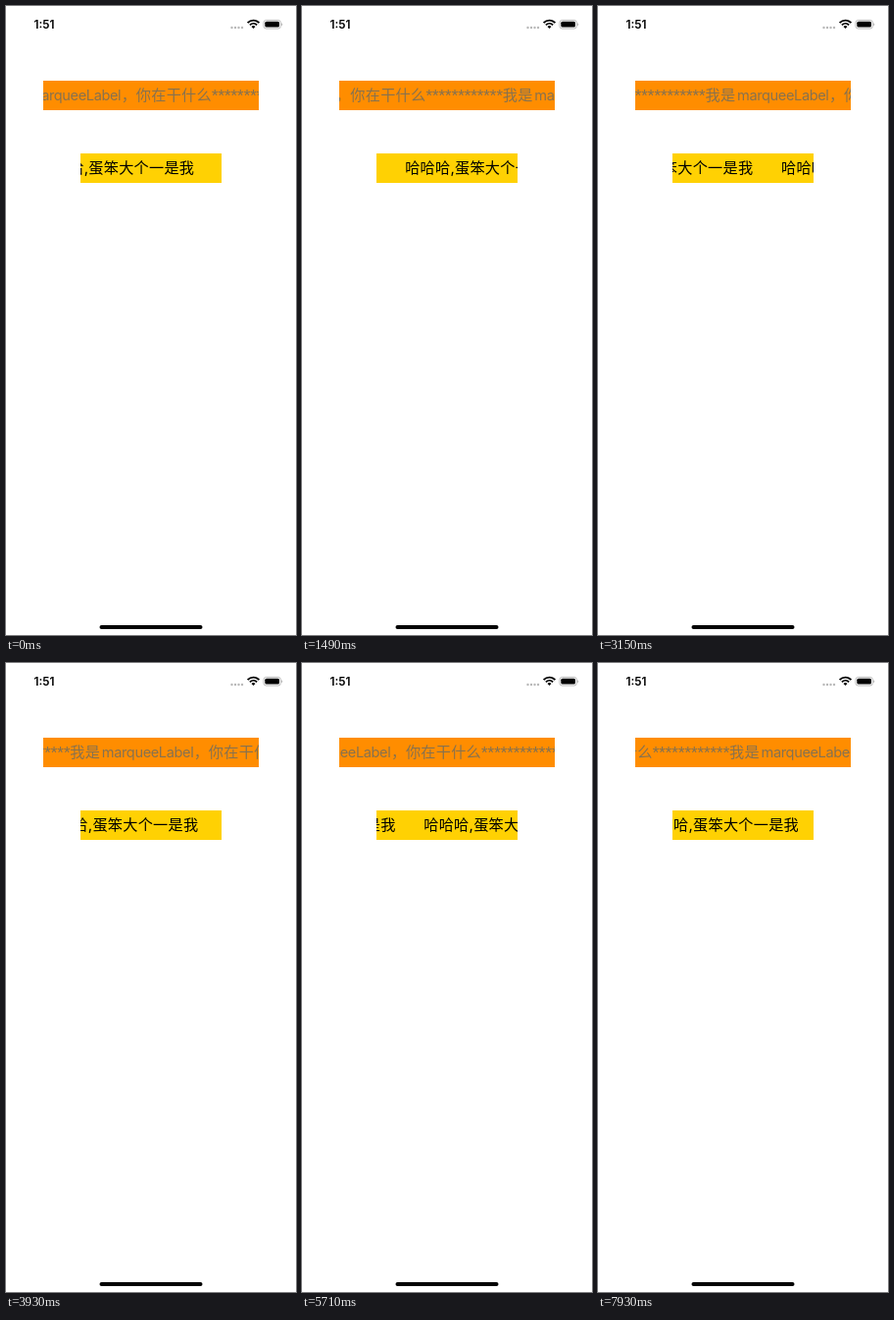
These frames come from a looping animation (296 px wide and 640 px high, 8000 ms). An HTML page:

```html
<!DOCTYPE html>
<html lang="zh-CN">
<head>
<meta charset="utf-8">
<title>Marquee labels</title>
<style>
html, body { margin: 0; width: 100%; height: 100%; overflow: hidden; background: #fff; }
body { position: relative; font-family: Inter, "Noto Sans CJK SC", "Noto Sans CJK", sans-serif; }
svg { position: absolute; left: 0; top: 0; }
.label { position: absolute; height: 30px; overflow: hidden; white-space: pre;
  font-size: 15.18px; line-height: 30px; letter-spacing: .25px; }
.label > div, .label span { position: absolute; left: 0; top: 0; }
#top { left: 38px; top: 76px; width: 220px; background: #ff8d00; color: #87724f; }
#low { left: 76px; top: 150px; width: 144px; background: #ffd103; color: #000; }
.label .latin { left: 32.5px; font-size: 14.6px; letter-spacing: -.4px; }
.label .comma { left: 126.5px; }
.label .ask { left: 141.5px; }
.label .stars { left: 218.7px; font-family: Roboto, sans-serif; letter-spacing: 0; }
</style>
</head>
<body>
<svg width="296" height="640" viewBox="0 0 296 640">
  <text x="28.5" y="23" font-size="11.8" font-weight="600">1:51</text>
  <g fill="#b8b8b8">
    <circle cx="230.5" cy="22" r="1.2"/><circle cx="234" cy="22" r="1.2"/>
    <circle cx="237.5" cy="22" r="1.2"/><circle cx="241" cy="22" r="1.2"/>
  </g>
  <g fill="none" stroke="#000" stroke-width="1.9">
    <path d="M246.6 17.1A8.3 8.3 0 0 1 258.4 17.1M248.9 19.4A5.1 5.1 0 0 1 256.1 19.4"/>
  </g>
  <path d="M250.5 21A2.9 2.9 0 0 1 254.5 21L252.5 23Z"/>
  <rect x="262.9" y="14.4" width="17.5" height="8.6" rx="2.6" fill="none" stroke="#aaa" stroke-width=".8"/>
  <rect x="264.3" y="15.8" width="14.7" height="5.8" rx="1.5"/>
  <path d="M281.3 17.2Q283.4 18.7 281.3 20.2Z" fill="#aaa"/>
  <rect x="95.5" y="630" width="105" height="4" rx="2"/>
</svg>
<div class="label" id="top"><div><span>我是</span><span class="latin">marqueeLabel</span><span class="comma">，</span><span class="ask">你在干什么</span><span class="stars">************</span></div></div>
<div class="label" id="low"><div>哈哈哈,蛋笨大个一是我</div></div>
<script>
const LOOP = 8000;

// Evenly spaced update times: [first, last, count]
const starts = [0];
for (const [a, b, n] of [
  [110, 900, 8], [1010, 1810, 8], [1930, 2710, 8], [2820, 3570, 8], [3690, 4490, 8],
  [4590, 5350, 8], [5470, 6250, 8], [6370, 7160, 8], [7260, 7930, 7]
]) for (let i = 0; i < n; i++) starts.push(a + (b - a) * i / (n - 1));

// Two copies of the text, one period apart; speed in px per ms
function marquee(id, x0, speed, period) {
  const first = document.querySelector(`#${id} > div`);
  const second = first.cloneNode(true);
  first.after(second);
  return t => {
    const x = ((x0 + speed * t) % period + period) % period;
    first.style.transform = `translateX(${x - period}px)`;
    second.style.transform = `translateX(${x}px)`;
  };
}

const labels = [
  marquee("top", 250.3, -.0569, 297),
  marquee("low", -42.6, .0489, 187.5)
];

function draw() {
  const now = performance.now() % LOOP;
  const t = starts.findLast(s => s <= now + .5);
  labels.forEach(move => move(t));
  requestAnimationFrame(draw);
}
draw();
</script>
</body>
</html>
```
